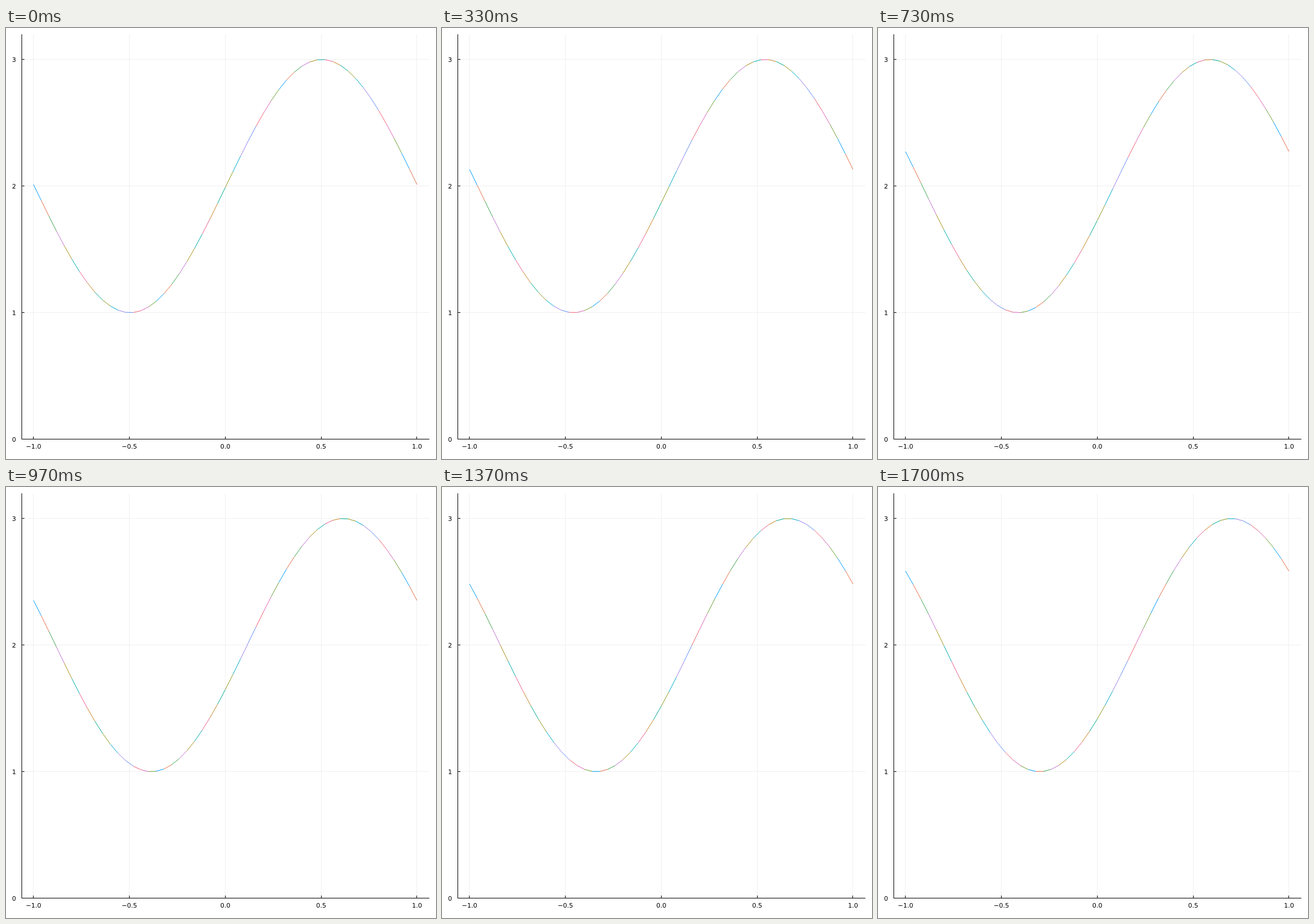
An HTML page with a canvas for the animation above (1730 ms loop, 748 by 749 pixels).

```html
<!DOCTYPE html>
<html>
<head>
<meta charset="utf-8">
<style>
html, body { margin: 0; width: 100%; height: 100%; overflow: hidden; background: #fff; }
canvas { display: block; }
</style>
</head>
<body>
<canvas id="plot" width="748" height="749"></canvas>
<script>
const ctx = document.getElementById('plot').getContext('2d');
const LOOP = 1730, SEGMENTS = 50, PHASE_STEP = 0.012;
const palette = ['#009afa', '#e36f47', '#3ea44e', '#c371d2', '#ac8e18', '#00aaae', '#ed5e93', '#c68225',
  '#00a98d', '#8e971e', '#00a9cc', '#9b7fea', '#618df6', '#f06073', '#dd65b6', '#6c9f33'];
const px = x => 381.4 + 333.5 * x;
const py = y => 714.7 - 220 * y;
const snap = v => Math.floor(v) + 0.5;

function line(x1, y1, x2, y2, color) {
  ctx.strokeStyle = color;
  ctx.beginPath();
  ctx.moveTo(x1, y1);
  ctx.lineTo(x2, y2);
  ctx.stroke();
}

function drawAxes() {
  const left = 27.5, right = 736.5, top = 11, bottom = 714.5;
  const xs = [-1, -0.5, 0, 0.5, 1], ys = [0, 1, 2, 3];
  for (const x of xs) line(snap(px(x)), top, snap(px(x)), bottom, '#f0f0f0');
  for (const y of ys) line(left, snap(py(y)), right, snap(py(y)), '#f0f0f0');

  line(left, top, left, bottom + 0.5, '#000');
  line(left - 0.5, bottom, right, bottom, '#000');

  ctx.font = '11px "DejaVu Sans", sans-serif';
  ctx.fillStyle = '#000';
  ctx.textAlign = 'center';
  for (const x of xs) {
    line(snap(px(x)), bottom, snap(px(x)), bottom - 4.5, '#000');
    ctx.fillText(x.toFixed(1).replace('-', '\u2212'), px(x), 731);
  }
  ctx.textAlign = 'right';
  for (const y of ys) {
    line(left, snap(py(y)), left + 4.5, snap(py(y)), '#000');
    ctx.fillText(y, 17.5, py(y) + 4);
  }
}

function drawWave(phase) {
  const wave = x => py(2 + Math.sin(Math.PI * x - phase));
  for (let i = 0; i < SEGMENTS; i++) {
    const a = -1 + 2 * i / SEGMENTS, b = a + 2 / SEGMENTS;
    line(px(a), wave(a), px(b), wave(b), palette[i % palette.length]);
  }
}

function draw(now) {
  // 30 steps per second, with step times rounded to 10 ms
  const tick = Math.floor(now % LOOP / 10);
  const step = Math.floor(tick * 0.3 + 0.102);
  ctx.fillStyle = '#fff';
  ctx.fillRect(0, 0, 748, 749);
  ctx.lineWidth = 1;
  drawAxes();
  drawWave((step + 1) * PHASE_STEP);
}

const start = performance.now();
function loop() {
  draw(performance.now() - start);
  requestAnimationFrame(loop);
}
loop();
</script>
</body>
</html>
```
